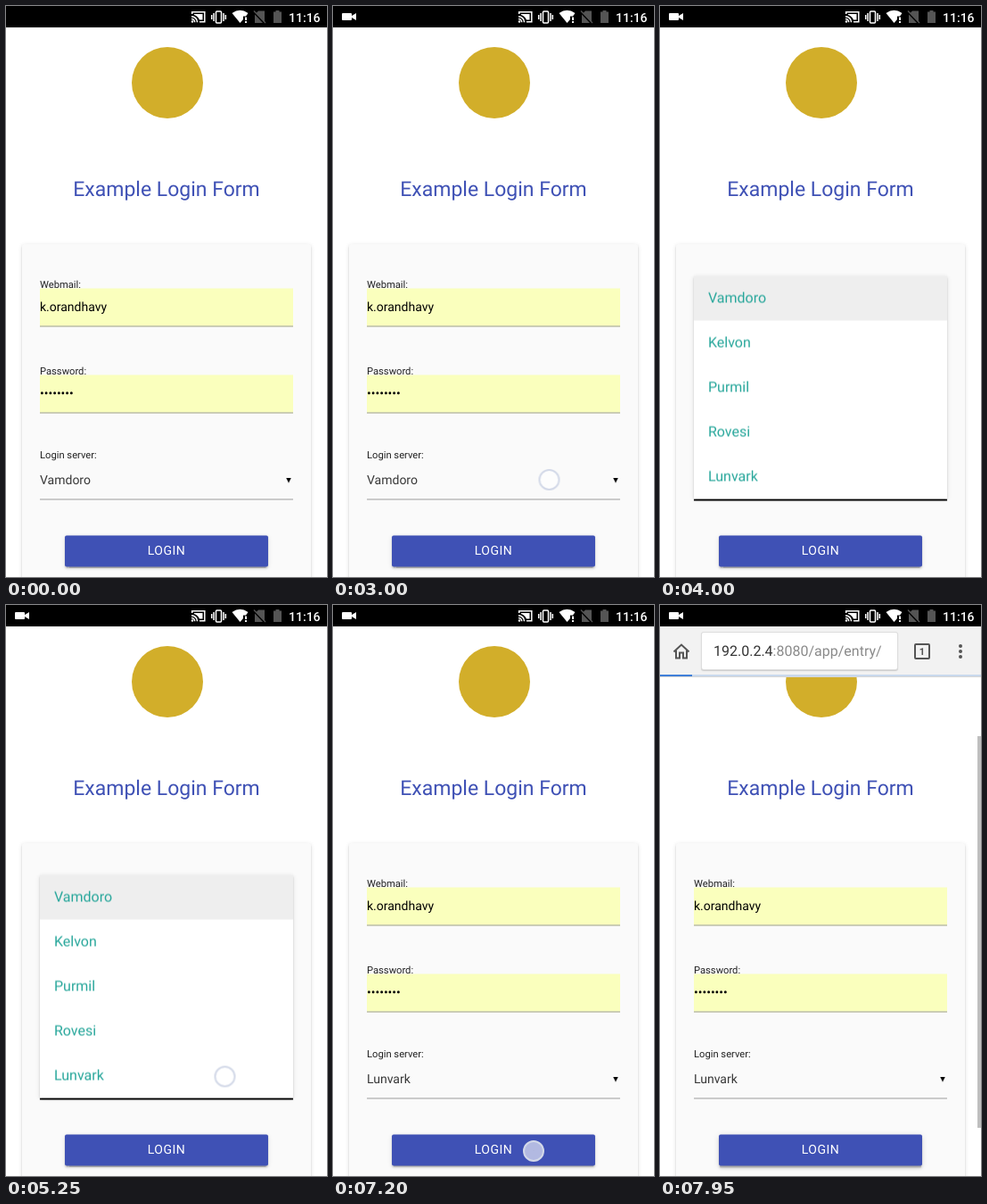
These frames come from a looping animation (360 by 640 pixels, 8 s). An HTML page:

```html
<!DOCTYPE html>
<html lang="en">
<head>
<meta charset="utf-8">
<title>Login form</title>
<style>
  html, body { margin: 0; width: 100%; height: 100%; overflow: hidden; background: #fff; }
  body { font: 14px/42px Roboto, "Noto Sans", sans-serif; color: rgba(0, 0, 0, .87); text-rendering: geometricPrecision; }
  #stage { position: relative; width: 360px; height: 640px; overflow: hidden; background: #fff; }
  #stage div, #stage svg { position: absolute; white-space: nowrap; }

  .emblem { left: 141px; top: 46px; width: 80px; height: 80px; border-radius: 50%; background: #d2ae2a; }
  .title { left: 0; width: 360px; top: 185px; text-align: center; font-size: 23px; color: #3f51b5; }
  .card {
    left: 18px; top: 267px; width: 324px; height: 400px; border-radius: 2px; background: #fafafa;
    box-shadow: 0 2px 2px rgba(0, 0, 0, .14), 0 1px 5px rgba(0, 0, 0, .12), 0 3px 1px -2px rgba(0, 0, 0, .2);
  }
  .label { left: 38px; font-size: 11.2px; line-height: 16px; }
  .field { left: 38px; width: 284px; height: 42px; border-bottom: 1px solid #9e9e9e; transform: translateY(.5px); }
  .filled { background: #faffbd; color: #000; }
  .before, .after { color: rgba(0, 0, 0, .78); }
  .before { animation: hide 8s step-end infinite; }
  .after { animation: show 8s step-end infinite; }
  .tap { inset: 0; background: rgba(61, 159, 227, .4); opacity: 0; }
  .field .tap { animation: tapField 8s linear infinite; }
  .menu .tap { top: 200px; animation: tapItem 8s linear infinite; }
  .focus { left: 0; top: 42px; width: 284px; height: 2px; background: #000; animation: focus 8s linear infinite; }

  .menu {
    left: 38px; top: 302px; width: 284px; height: 250px; overflow: hidden; background: #fff;
    font-size: 16px; line-height: 50px; color: #26a69a; transform: translateY(.5px);
    box-shadow: 0 2px 2px rgba(0, 0, 0, .14), 0 1px 5px rgba(0, 0, 0, .12), 0 3px 1px -2px rgba(0, 0, 0, .2);
    animation: unroll 8s linear infinite, fade 8s linear infinite;
  }
  .menu p { margin: 0; padding-left: 16px; }
  .menu p:first-child { background: #eee; }

  .button {
    left: 66px; top: 594px; width: 228px; height: 35px; border-radius: 2px; overflow: hidden; background: #3f51b5;
    color: #fff; line-height: 35px; text-align: center; letter-spacing: .5px; transform: translateY(-.5px);
    box-shadow: 0 2px 2px rgba(0, 0, 0, .14), 0 1px 5px rgba(0, 0, 0, .12), 0 3px 1px -2px rgba(0, 0, 0, .2);
    animation: lift 8s linear infinite;
  }
  .ripple {
    left: -69px; top: -210px; width: 456px; height: 456px; border-radius: 50%; background: rgba(0, 0, 0, .13);
    animation: ripple 8s linear infinite, rippleFade 8s linear infinite;
  }
  .button span { position: relative; }
  .touch {
    left: -12px; top: -12px; width: 20px; height: 20px; border: 2px solid #d3d9e8; border-radius: 50%;
    background: rgba(255, 255, 255, .6); animation: touch 8s step-end infinite;
  }

  .scrollbar { left: 356px; width: 4px; background: rgba(128, 128, 128, .5); animation: scrollbar 8s linear infinite; }
  .toolbar {
    left: 0; top: 24px; width: 360px; height: 56px; background: #f2f2f2; border-bottom: 1px solid #d6d6d6;
    animation: slide 8s linear infinite;
  }
  .address {
    left: 47px; top: 7px; width: 206px; height: 41px; padding-left: 13px; border-radius: 2px; background: #fff;
    box-shadow: 0 0 0 1px #ddd, 0 1px 1px 1px #ccc; font-size: 16px; color: #8a8a8a;
  }
  .address b { font-weight: 400; color: #333; }
  .progress { left: 0; top: 54px; width: 360px; height: 2px; background: linear-gradient(90deg, #4080d8 36px, #c9d8ec 36px); }
  .status { left: 0; top: 0; width: 360px; height: 24px; background: #000; }
  .status text { font: 500 14px Roboto, "Noto Sans", sans-serif; }
  .camera { animation: record 8s step-end infinite; }

  @keyframes record { 0% { opacity: 0 } .625%, 100% { opacity: 1 } }
  @keyframes hide { 0% { opacity: 1 } 67.5%, 100% { opacity: 0 } }
  @keyframes show { 0% { opacity: 0 } 67.5%, 100% { opacity: 1 } }
  @keyframes touch {
    0% { opacity: 0; transform: translate(242.5px, 531px) }
    37.5% { opacity: 1; transform: translate(242.5px, 531px) }
    38.75% { opacity: 0; transform: translate(245.5px, 528.5px) }
    65.625% { opacity: 1; transform: translate(245.5px, 528.5px) }
    66.875% { opacity: 0; transform: translate(225px, 612px) }
    89.375% { opacity: 1; transform: translate(225px, 612px) }
    90.625%, 100% { opacity: 0; transform: translate(225px, 612px) }
  }
  @keyframes tapField { 0%, 39.3% { opacity: 0 } 39.375%, 40% { opacity: 1 } 43.75%, 100% { opacity: 0 } }
  @keyframes tapItem { 0%, 66.8% { opacity: 0 } 66.875%, 67.5% { opacity: 1 } 70%, 100% { opacity: 0 } }
  @keyframes focus { 0%, 40% { opacity: 0 } 42.5%, 67.5% { opacity: 1 } 71.25%, 100% { opacity: 0 } }
  @keyframes unroll {
    0% { height: 0 }
    40.9% { height: 0; animation-timing-function: cubic-bezier(.215, .61, .355, 1) }
    44.65%, 100% { height: 250px }
  }
  @keyframes fade {
    0% { opacity: 0 }
    40.9% { opacity: 0; animation-timing-function: cubic-bezier(.39, .575, .565, 1) }
    44.65% { opacity: 1 }
    68.125% { opacity: 1; animation-timing-function: ease-in-out }
    70.94%, 100% { opacity: 0 }
  }
  @keyframes lift {
    0%, 90% { box-shadow: 0 2px 2px rgba(0, 0, 0, .14), 0 1px 5px rgba(0, 0, 0, .12), 0 3px 1px -2px rgba(0, 0, 0, .2) }
    93%, 100% { box-shadow: 0 3px 3px rgba(0, 0, 0, .14), 0 1px 7px rgba(0, 0, 0, .12), 0 3px 1px -1px rgba(0, 0, 0, .2) }
  }
  @keyframes ripple {
    0% { transform: scale(0) }
    90% { transform: scale(0); animation-timing-function: cubic-bezier(.25, .46, .45, .94) }
    99.375%, 100% { transform: scale(1) }
  }
  @keyframes rippleFade { 0%, 96.25% { opacity: 1 } 99.375%, 100% { opacity: 0 } }
  @keyframes slide { 0%, 92.375% { transform: translateY(-57px) } 94.9%, 100% { transform: none } }
  @keyframes scrollbar {
    0%, 92.37% { top: 53px; height: 528px; opacity: 0 }
    92.375% { top: 53px; height: 528px; opacity: 1 }
    94.9%, 100% { top: 147px; height: 439px; opacity: 1 }
  }
</style>
</head>
<body>
<div id="stage">
  <div class="emblem"></div>
  <div class="title">Example Login Form</div>
  <div class="card"></div>

  <div class="field filled" style="top:316px">k.orandhavy</div>
  <div class="label" style="top:305px">Webmail:</div>
  <div class="field filled" style="top:413px">••••••••</div>
  <div class="label" style="top:402px">Password:</div>
  <div class="field" style="top:510px">
    <div class="tap"></div>
    <div class="before">Vamdoro</div>
    <div class="after">Lunvark</div>
    <svg style="left:276px; top:18px" width="6" height="7"><path d="M0 0H6L3 6Z"/></svg>
    <div class="focus"></div>
  </div>
  <div class="label" style="top:496px">Login server:</div>

  <div class="menu">
    <p>Vamdoro</p><p>Kelvon</p><p>Purmil</p><p>Rovesi</p><p>Lunvark</p>
    <div class="tap"></div>
  </div>

  <div class="button"><div class="ripple"></div><span>LOGIN</span></div>
  <div class="touch"></div>

  <div class="scrollbar"></div>
  <div class="toolbar">
    <svg width="360" height="56" fill="none" stroke="#555" stroke-width="2">
      <path d="M15.500 28.500L24 20.500L32.500 28.500M18 27V35.500H22V29.500H26V35.500H30V27"/>
      <rect x="286" y="20" width="16" height="16" rx="1"/>
      <g fill="#555" stroke="none">
        <circle cx="337" cy="22" r="2"/><circle cx="337" cy="28" r="2"/><circle cx="337" cy="34" r="2"/>
        <text x="294" y="32" text-anchor="middle" font-size="11" font-weight="700">1</text>
      </g>
    </svg>
    <div class="address"><b>192.0.2.4</b>:8080/app/entry/</div>
    <div class="progress"></div>
  </div>

  <div class="status">
    <svg width="360" height="24" fill="#fff">
      <path class="camera" d="M11 8H20Q21 8 21 9V11L26 8V16L21 13V15Q21 16 20 16H11Q10 16 10 15V9Q10 8 11 8Z"/>
      <g fill="none" stroke="#fff" stroke-width="1.500">
        <path d="M208.700 9V6.700H222.800V17.700H217M208 11.700A6.500 6.500 0 0 1 214.500 18.200M208 14.500A3.700 3.700 0 0 1 211.700 18.200"/>
        <path d="M230.700 10V15M233 8V17M244 8V17M246.300 10V15"/>
        <rect x="235.500" y="6" width="6" height="13" rx="1"/>
      </g>
      <path d="M211 9H220.500V15.500H217Q215 11 211 10Z"/>
      <circle cx="209" cy="17.500" r="1.200"/>
      <path d="M253.500 8Q262.500 1.500 271.500 8L269 11.500H266V15L262.500 19Z"/>
      <path d="M268 12.500H270V16H268ZM268 17H270V19H268Z"/>
      <g fill="#555">
        <path d="M283 5.500H290V18L280.500 8ZM279 9.500L288 19H279Z"/>
        <path d="M278 5.500L291 19" stroke="#555" stroke-width="1.300"/>
        <path d="M302.500 5H306.500V6.500H309V19H300V6.500H302.500Z"/>
      </g>
      <text x="317" y="17.500">11:16</text>
    </svg>
  </div>
</div>
</body>
</html>
```
